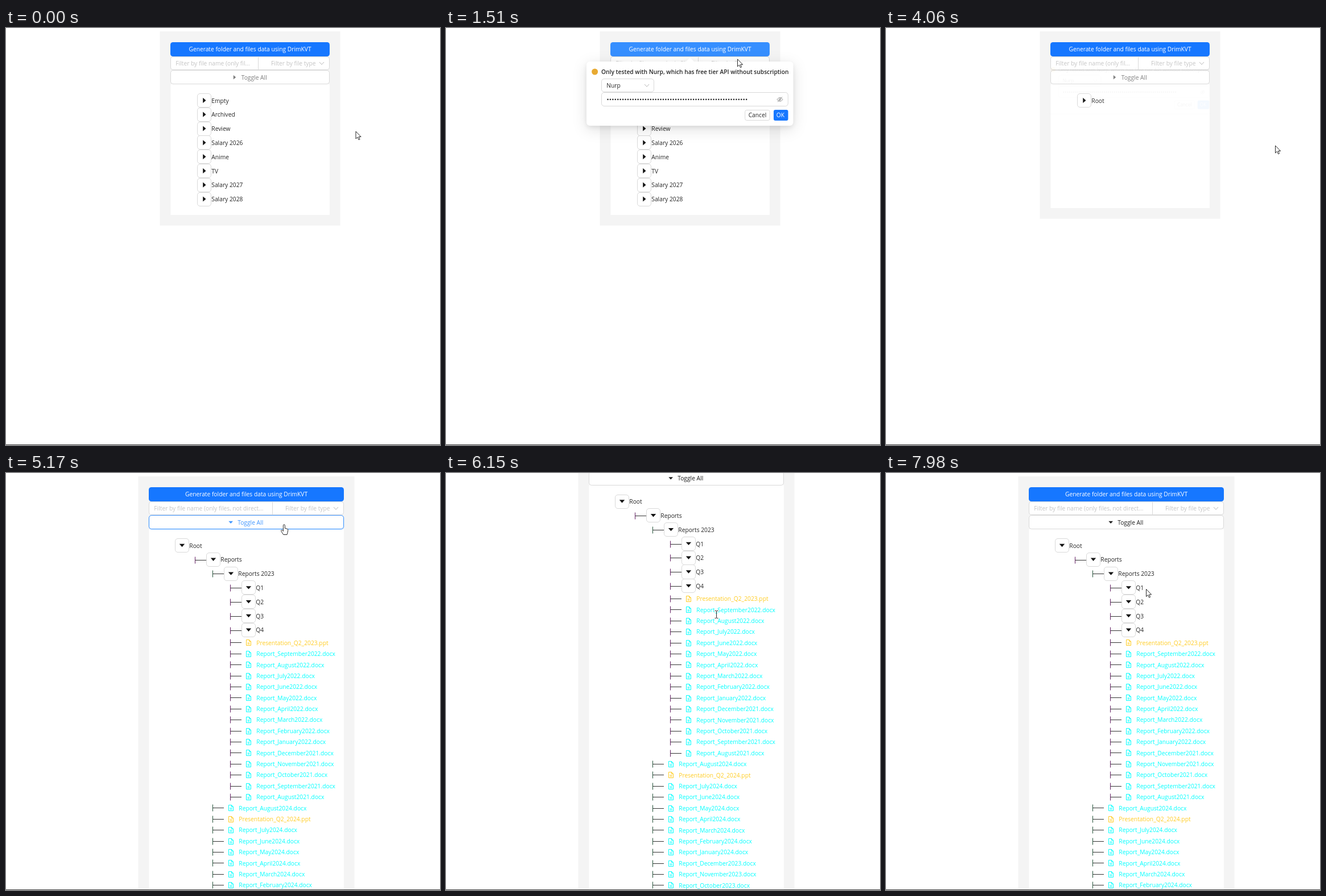
Animation of 763 by 734 pixels, one loop 8 s. Source, as an HTML page:

```html
<!DOCTYPE html>
<html lang="en">
<head>
<meta charset="utf-8">
<title>Folder tree</title>
<style>
  html, body { margin: 0; width: 100%; height: 100%; overflow: hidden; background: #fff; }
  svg { display: block; font: 10.25px "Open Sans", "Noto Sans", sans-serif; fill: #262626; }
  .popup { filter: drop-shadow(0 3px 4px #00000014) drop-shadow(0 6px 12px #0000001f); }
</style>
</head>
<body>
<svg id="stage" width="763" height="734" viewBox="0 0 763 734"></svg>
<script>
const LOOP = 8000, STEP = 68.8;
const BLUE = '#1677ff', HOVER = '#4096ff', LINE = '#d9d9d9', HINT = '#c4c4c4';
const MONTHS = ['January', 'February', 'March', 'April', 'May', 'June', 'July',
  'August', 'September', 'October', 'November', 'December'];
const FOLDERS = ['Empty', 'Archived', 'Review', 'Salary 2026', 'Anime', 'TV', 'Salary 2027', 'Salary 2028'];

// Keyframes: rows of [time, ...values]
const CURSOR = [[30, 615, 182], [850, 502, 40], [1400, 502, 40], [1900, 582, 153], [2080, 582, 153],
  [2440, 684.5, 207], [4300, 684.5, 207], [5000, 489, 91], [5200, 489, 91], [5430, 474.5, 248.5],
  [7250, 474.5, 248.5], [7560, 466, 62], [7660, 466, 62], [7975, 457.5, 204.5]];
const BUTTON = [[680, 22, 119, 255], [830, 64, 150, 255], [895, 64, 150, 255], [975, 24, 101, 226],
  [1040, 9, 88, 217], [1230, 64, 150, 255], [1450, 64, 150, 255], [1650, 22, 119, 255]];
const POPUP = [[1020, 0], [1230, 1], [3870, 1], [4085, 0]];
const LOADING = [[2080, 0], [2300, 1], [3800, 1], [3870, 0]];
const SCROLL = [[5750, 0], [5986, 41], [6120, 77.5], [6840, 77.5], [7018, 28.6], [7080, 0]];

const smooth = k => k * k * (3 - 2 * k);

function at(t, keys, ease = smooth) {
  const i = keys.findIndex(key => key[0] > t);
  if (i === 0) return keys[0].slice(1);
  if (i < 0) return keys[keys.length - 1].slice(1);
  const [t0, ...from] = keys[i - 1], [t1, ...to] = keys[i];
  const k = ease((t - t0) / (t1 - t0));
  return from.map((v, n) => v + (to[n] - v) * k);
}

// Heights land on whole screen pixels, lines on pixel centres
let scroll = 0;
const snap = y => Math.round(y - scroll) + scroll;
const snapLine = y => snap(y - 0.5) + 0.5;

const text = (x, y, s, attrs = '') => `<text x="${x}" y="${snap(y + 3.8)}" ${attrs}>${s}</text>`;
const label = (x, y, s, attrs = '') => text(x, y, s, `text-anchor="middle" ${attrs}`);
const path = (d, attrs = '', x = 0, y = 0) => `<path d="${d}" transform="translate(${x} ${y})" ${attrs}/>`;
const box = (x1, y1, x2, y2, r, attrs) =>
  `<rect x="${x1}" y="${y1}" width="${x2 - x1}" height="${y2 - y1}" rx="${r}" ${attrs}/>`;
const framed = (x1, y1, x2, y2, color = LINE, r = 4.6) =>
  box(x1, snapLine(y1), x2, snapLine(y2), r, `fill="#fff" stroke="${color}"`);
const stroke = (color, width = 1) => `fill="none" stroke="${color}" stroke-width="${width}"`;
const chevron = (x, y) => path('M-4-2 0 2.3 4-2', stroke('#b8b8b8'), x, y);
const triangle = (x, y, open, color, size = 1) =>
  `<g transform="translate(${x} ${y}) scale(${size})">` +
  path(open ? 'M-4.7-2.6h9.4L0 2.8z' : 'M-2.3-4.6v9.2L3 0z', `fill="${color}"`) + '</g>';

// Expanding ring after a click
function wave(t, start, x1, y1, x2, y2) {
  const k = (t - start) / 400;
  if (k < 0 || k >= 1) return '';
  const s = 4.6 * Math.sqrt(k), h = s / 2;
  return box(x1 - h, y1 - h, x2 + h, y2 + h, 4.6 + h, `${stroke(HOVER, s)} opacity="${0.25 * (1 - k)}"`);
}

function reports(month, year, count) {
  return Array.from({ length: count }, (_, i) => {
    const n = year * 12 + month - 1 - i;
    return `Report_${MONTHS[n % 12]}${Math.floor(n / 12)}.docx`;
  });
}

const folder = (x, y, name, open) =>
  framed(x, y - 12.3, x + 24, y + 11.7) + triangle(x + 12, y - 0.4, open, '#141414') + text(x + 24.8, y, name);

const branch = (x, y, color) =>
  path('M0 0H19.5', stroke('#333'), x, snapLine(y)) + path('M0-6V6', stroke(color), x, snapLine(y));

function file(x, y, name) {
  const color = name.endsWith('ppt') ? '#fc2' : '#0ff';
  return path('M-4-5h5l3 3v7h-8zM1-5v3h3M-2 .5h4M-2 2.5h4', stroke(color), x, snapLine(y)) +
    text(x + 13.8, y, name, `fill="${color}"`);
}

function openTree() {
  const purple = '#632063', green = '#1f4f35';
  let out = folder(297.5, 127.8, 'Root', true) +
    branch(332.5, 153, purple) + folder(352.5, 152.6, 'Reports', true) +
    branch(363.5, 177.8, green) + folder(383.5, 177.4, 'Reports 2023', true);
  for (let q = 0; q < 4; q++) {
    const y = 202.2 + q * 24.8;
    out += branch(394.5, y + 0.4, purple) + folder(414.5, y, 'Q' + (q + 1), true);
  }
  const inner = ['Presentation_Q2_2023.ppt', ...reports(9, 2022, 14)];
  const outer = reports(8, 2024, 13);
  outer.splice(1, 0, 'Presentation_Q2_2024.ppt');
  [...inner, ...outer].forEach((name, i) => {
    const y = 298.9 + i * 19.4, deep = i < inner.length;
    out += branch(deep ? 394.5 : 363.5, y, deep ? purple : green) + file(deep ? 426.5 : 395.5, y, name);
  });
  return out;
}

function page(t, mouse, free) {
  const open = t > 5150, root = t > 3870;
  const L = open ? 251.5 : 289.5, R = open ? 593.5 : 568.5, mid = (L + R) / 2, split = R - 125;
  const bottom = open ? 2000 : root ? 317 : 329;
  const over = (x1, y1, x2, y2) =>
    free && mouse.x > x1 && mouse.x < x2 && mouse.y > y1 && mouse.y < y2;
  const onToggle = over(L, 75, R, 99), onInput = over(L, 50, split, 74), onSelect = over(split, 50, R, 74);
  const edge = on => `fill="#fff" stroke="${on ? HOVER : LINE}"`;
  const ink = onToggle ? HOVER : open ? '#1f1f1f' : '#7d7d7d';
  const fieldTop = snapLine(50.1);
  mouse.kind = over(L, 25, R, 50) || onToggle || onSelect ? 'hand' : onInput ? 'beam' : mouse.kind;

  const tree = open ? openTree()
    : (root ? ['Root'] : FOLDERS).map((name, i) => folder(336.5, 127.8 + i * 24.8, name, false)).join('');

  return box(L - 19, snap(6.2), R + 19, bottom + 18.7, 0, 'fill="#f4f4f4"') +
    box(L, 99, R + 0.5, bottom, 0, 'fill="#fff"') +
    path(`M${split} 0H${L + 4.6}q-4.6 0-4.6 4.6v13.8q0 4.6 4.6 4.6H${split}z`, edge(onInput), 0, fieldTop) +
    path(`M${split} 0H${R - 4.6}q4.6 0 4.6 4.6v13.8q0 4.6-4.6 4.6H${split}z`, edge(onSelect), 0, fieldTop) +
    text(L + 8.8, 62, `Filter by file name (only ${open ? 'files, not direct' : 'fil'}...`, `fill="${HINT}"`) +
    text(R - 102.5, 62, 'Filter by file type', `fill="${HINT}"`) + chevron(R - 13.5, 62) +
    framed(L, 74.9, R, 98.7, onToggle ? HOVER : LINE) +
    triangle(mid - 27.3, 86.8, open, ink, 0.82) + text(mid - 15.3, 86.8, 'Toggle All', `fill="${ink}"`) +
    box(L - 0.5, snap(24.8), R + 0.5, snap(49.6), 4.6, `fill="rgb(${at(t, BUTTON).map(Math.round)})"`) +
    label(mid, 37.3, 'Generate folder and files data using DrimKVT', 'fill="#fff"') +
    wave(t, 1000, L, 25, R, 49.4) + wave(t, 5140, L, 75, R, 99) + tree;
}

function popup(t, shown) {
  const [load] = at(t, LOADING);
  const okX = 576 - 18.7 * load, cancelX = okX - 50.3;
  const spin = 185 + (t - 2477) * 0.36;
  return `<g opacity="${shown}" transform="translate(429 58) scale(${0.8 + 0.2 * shown}) translate(-429 -58)">
    <g class="popup">${path('M421 60l6.5-6.5q1.5-1.3 3 0L437 60z', 'fill="#fff"')}
    ${box(247, 59, 610.5, 172, 6, 'fill="#fff"')}</g>
    <circle cx="261.6" cy="77" r="5.5" fill="#e8aa32"/>` +
    text(273, 77, 'Only tested with Nurp, which has free tier API without subscription',
      'font-weight="600" font-size="10.23"') +
    framed(273.5, 89, 365.5, 112.9) + text(282.3, 101, 'Nurp') + chevron(353, 101) +
    framed(273.5, 113.8, 601.3, 137.7) +
    path('M284.5 125.8H530', `${stroke('#262626', 2.6)} stroke-linecap="round" stroke-dasharray="0 4.43"`) +
    path('M-5 0Q0-7 5 0 0 7-5 0zM-4 4.3 4-4.5', stroke('#8c8c8c', 0.9), 587, 125.8) +
    `<circle cx="587" cy="125.8" r="1.6" ${stroke('#8c8c8c', 0.9)}/>` +
    framed(cancelX, 144.4, cancelX + 43.5, 162.6, LINE, 3) + label(cancelX + 21.8, 153.6, 'Cancel') +
    box(okX, 144, 601.5, 163, 3, `fill="${BLUE}" fill-opacity="${1 - 0.35 * load}"`) +
    label(588, 153.6, 'OK', 'fill="#fff"') +
    `<g opacity="${load}" transform="translate(567.3 153.8) rotate(${spin})">` +
    path('M0-4.4A4.4 4.4 0 0 1 4.4 0', stroke('#fff', 0.9)) + '</g>' +
    wave(t, 2080, okX, 144, 601.5, 163) + '</g>';
}

const POINTERS = {
  arrow: 'M0 0V13l3-2.8 2.1 4.6 2-.9-2-4.4h4z',
  hand: 'M-1.6 1.4a1.5 1.5 0 0 1 3 0V6.3l4 1q1.6.5 1.4 2.2L6 14l-1 3.5h-6.3L-5 11.7q-1-1.7.2-2.2 1.2-.4 2.1.8l1.1 1.2z',
  beam: 'M-2-6h2q1 0 1 1v11q0 1-1 1h-2M4-6H2q-1 0-1 1M1 6q0 1 1 1h2'
};

function scene(t) {
  const [x, y] = at(t, CURSOR), [shown] = at(t, POPUP);
  [scroll] = at(t, SCROLL, k => k);
  const onOk = shown === 1 && x > 560 && x < 602 && y > 144 && y < 163;
  const mouse = { x, y, kind: onOk ? 'hand' : t > 6100 && t < 7270 ? 'beam' : 'arrow' };
  const content = page(t, mouse, shown === 0 || y < 50);
  return `<g transform="translate(0 ${-scroll})">${content}</g>` +
    box(0, 733, 763, 734, 0, 'fill="#444"') +
    (shown ? popup(t, shown) : '') +
    path(POINTERS[mouse.kind], `fill="${mouse.kind === 'beam' ? 'none' : '#fff'}" stroke="#111" stroke-width=".9"`, x, y);
}

const stage = document.getElementById('stage');
let last = -1;

function draw(now) {
  const step = Math.floor((now % LOOP) / STEP + 0.1);
  if (step !== last) stage.innerHTML = scene(step * STEP);
  last = step;
  requestAnimationFrame(draw);
}
draw(0);
</script>
</body>
</html>
```
